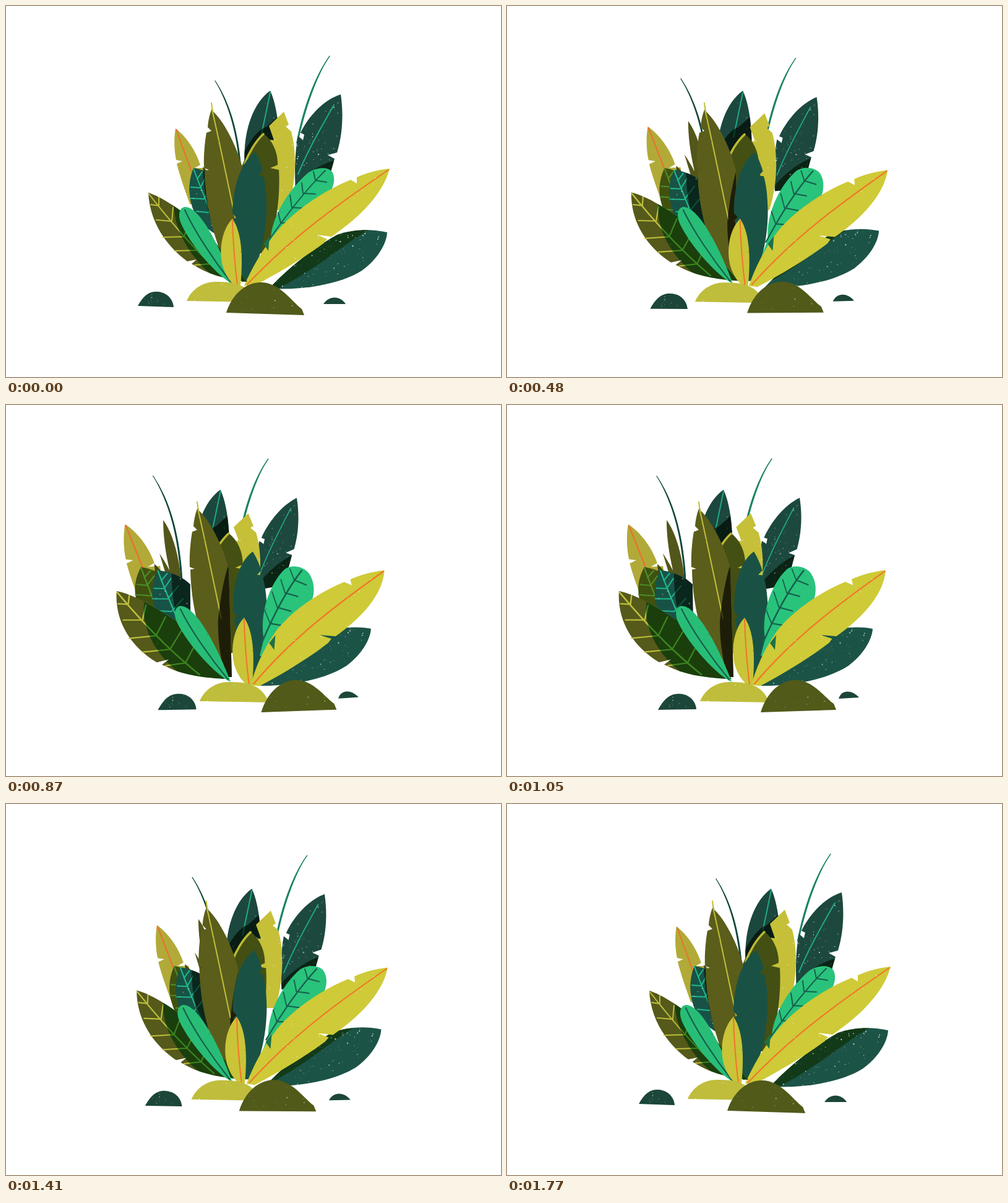
Recreate the animation shown at these times as an HTML page. Size 800x600 px, loop 1800 ms.

```html
<!DOCTYPE html>
<html lang="en">
<head>
<meta charset="utf-8">
<title>Swaying foliage</title>
<style>
  @property --p { syntax: '<number>'; inherits: true; initial-value: 0; }
  html, body { margin: 0; width: 100%; height: 100%; overflow: hidden; background: #fff; }
  svg { display: block; width: 800px; height: 600px; animation: turn .9s cubic-bezier(.5, 0, .5, 1) infinite alternate; }
  @keyframes turn { from { --p: 0; } to { --p: 1; } }
  .part { isolation: isolate; }
  .line { fill: none; stroke-linecap: round; }
  .shade { mix-blend-mode: multiply; }
</style>
</head>
<body>
<svg id="stage" viewBox="0 0 800 600"><defs id="defs"></defs></svg>
<script>
const NS = 'http://www.w3.org/2000/svg';
const stage = document.getElementById('stage');
const defs = document.getElementById('defs');
const REACH = 0.955; // share of the full swing at which the end points were measured

function add(parent, tag, attrs) {
  const el = document.createElementNS(NS, tag);
  for (const k in attrs) el.setAttribute(k, attrs[k]);
  return parent.appendChild(el);
}

// Motions are matrix offsets, scaled by --p and added to the identity.
const shift = (dx, dy) => [0, 0, 0, 0, dx / REACH, dy / REACH];

function warp([x0, y0, x1, y1, x2, y2], [X0, Y0, X1, Y1, X2, Y2]) {
  const ux = x1 - x0, uy = y1 - y0, vx = x2 - x0, vy = y2 - y0;
  const det = ux * vy - vx * uy;
  const solve = (U, V) => [(U * vy - V * uy) / det, (V * ux - U * vx) / det];
  const [a, c] = solve(X1 - X0, X2 - X0);
  const [b, d] = solve(Y1 - Y0, Y2 - Y0);
  const e = X0 - a * x0 - c * y0, f = Y0 - b * x0 - d * y0;
  return [a - 1, b, c, d - 1, e, f].map(n => n / REACH);
}

function animate(el, motion) {
  const cells = motion.map((n, i) =>
    `calc(${i === 0 || i === 3 ? 1 : 0} + var(--p) * ${n.toFixed(5)})`);
  el.style.transform = `matrix(${cells.join(', ')})`;
}

// Grain textures
let seed = 7;
function random() {
  seed = (seed * 16807) % 2147483647;
  return seed / 2147483647;
}

function grain(id, color, count, size) {
  const tile = add(defs, 'pattern', { id, width: 130, height: 130, patternUnits: 'userSpaceOnUse' });
  for (let i = 0; i < count; i++) {
    add(tile, 'circle', {
      cx: (random() * 130).toFixed(1), cy: (random() * 130).toFixed(1),
      r: (0.25 + random() ** 3 * size).toFixed(2), fill: color
    });
  }
}
grain('light', '#e6ead0', 50, 0.7);
grain('snow', '#dfe8dc', 190, 0.8);
grain('dark', '#4a5a1c', 45, 0.7);

let count = 0;
function part({ d, fill, motion, lines = [], shade, grain }) {
  const g = add(stage, 'g', { class: 'part' });
  animate(g, motion);
  add(g, 'path', { d, fill });
  for (const [path, stroke, width] of lines)
    add(g, 'path', { class: 'line', d: path, stroke, 'stroke-width': width });
  if (shade) {
    const id = 'clip' + count++;
    add(add(defs, 'clipPath', { id }), 'path', { d });
    const box = add(g, 'g', { class: 'shade', 'clip-path': `url(#${id})` });
    animate(add(box, 'path', { d: shade.d, fill: shade.fill }), shade.motion);
  }
  if (grain) add(g, 'path', { d, fill: `url(#${grain})` });
}

// Tall stems
part({
  d: 'M338 121C362 156 381 212 382 300L379 300C378 215 361 162 338 121Z', fill: '#10483b',
  motion: warp([381, 255, 338, 121, 481, 255], [288, 250, 242, 115, 388, 250]),
  lines: [['M338 121C362 158 380 213 380.500 300', '#10483b', 1.2]]
});
part({
  d: 'M523 81C499 112 480 165 469 222L472 222C483 167 503 112 523 81Z', fill: '#1d8366',
  motion: warp([471, 215, 523, 81, 571, 215], [381, 215, 428, 87, 481, 215]),
  lines: [['M523 81C501 112 481 166 470.500 222', '#1d8366', 1.5]]
});

// Back leaves
part({
  d: 'M274 198C271 215 272 235 275 249L285 251L276 255C281 275 288 295 297 320L330 330L322 262L305 262L314 257C306 232 290 210 274 198Z',
  fill: '#b1aa38', grain: 'light',
  motion: warp([296, 312, 274, 198, 320, 275], [222, 318, 196, 193, 250, 275]),
  lines: [['M275 200L300 268', '#e8722e', 2]]
});
part({
  d: 'M344 186C358 205 372 245 374 300L362 300C352 260 344 225 344 186ZM338 240C350 258 362 280 366 300L356 300Z',
  fill: '#53561a', grain: 'light', motion: shift(-86, 0)
});
part({
  d: 'M427 137C395 160 380 215 387 270L440 270C444 215 440 165 427 137Z',
  fill: '#1b473e', grain: 'light', motion: shift(-77, 0),
  lines: [['M427 140L412 212', '#20a983', 2]],
  shade: { d: 'M383 240C395 215 410 198 420 196L440 178L450 270L380 270Z', fill: '#4b6350', motion: shift(0, 0) }
});
part({
  d: 'M541 143C512 152 488 180 476 205L482 208L480 217L472 210C467 235 466 265 468 300L505 300L525 268L531 247L520 241L535 237C545 205 545 170 541 143Z',
  fill: '#1c483e', grain: 'snow',
  motion: warp([470, 290, 541, 143, 525, 268], [411, 290, 473, 150, 460, 262]),
  lines: [['M530 160C510 195 487 235 472 272', '#20a983', 2]],
  shade: { d: 'M440 320C470 282 500 255 540 248L540 330L440 330Z', fill: '#5a7a50', motion: shift(6, -4) }
});
part({
  d: 'M449 171L457 192L452 195L461 203C471 240 468 290 455 330L415 330L412 215L433 217L425 194Z',
  fill: '#c5c038', grain: 'light',
  motion: warp([455, 330, 449, 171, 555, 330], [403, 330, 394, 175, 503, 330])
});

// Veined pair on the left
const pair = 'M303 262C294 285 294 310 305 335C315 352 330 365 345 372L356 350L352 288C340 275 325 266 303 262Z';
const pairVeins = 'M303 263C313 290 325 320 345 368M314 294L299 293M320 312L298 311M327 334L308 332M309 280L317 268M314 294L323 277M320 312L335 290M327 334L343 312';
const pairFrom = [303, 262, 335, 365, 352, 288];
part({
  d: pair, fill: '#40510f', grain: 'dark',
  motion: warp(pairFrom, [222, 262, 250, 358, 274, 288]),
  lines: [[pairVeins, '#4c922a', 2]]
});
part({ d: 'M318 260C335 275 345 300 350 330L325 330Z', fill: '#3c4813', motion: shift(-75, -3) });
part({
  d: pair, fill: '#185247', grain: 'light',
  motion: warp(pairFrom, [248, 267, 277, 363, 300, 290]),
  lines: [[pairVeins, '#1fb98b', 2]],
  shade: { d: 'M318 250C318 300 328 350 345 380L380 380L380 250Z', fill: '#647566', motion: shift(5, 0) }
});

// Middle leaves
part({
  d: 'M416 206C432 218 440 240 439 257L427 262L441 265C444 310 435 360 425 400L385 400L380 262C388 240 402 220 416 206Z',
  fill: '#444f13', grain: 'dark', motion: shift(-54, 1),
  lines: [['M416 207C403 219 392 238 386 255', '#bdb934', 3.5]]
});
part({
  d: 'M332 156L335 171C352 186 374 228 383 265L388 440L365 440C340 390 322 330 321 266L328 265L320 262C319 240 322 215 324 205L332 202L326 196C327 183 330 172 333 166Z',
  fill: '#5b5d1b', grain: 'dark', motion: shift(-22, 0),
  lines: [['M332 157L334 172C345 220 355 270 371 345', '#c2bf3a', 2]],
  shade: { d: 'M392 255C380 290 376 330 374 350C374 390 380 420 390 450L410 450L410 255Z', fill: '#525248', motion: shift(-8, 0) }
});
part({
  d: 'M403 236C380 252 367 290 366 335L372 342L367 346C370 385 376 420 381 446L392 446C408 420 420 375 421 330C421 305 420 290 416 275L408 274L415 267C412 255 408 245 403 236Z',
  fill: '#195244', grain: 'dark',
  motion: warp([385, 445, 403, 236, 485, 445], [392, 443, 399, 237, 492, 443])
});

// Right leaves
part({
  d: 'M428 375C430 340 458 295 488 270C500 261 520 259 527 268C533 278 530 292 522 305L440 400L415 400Z',
  fill: '#29c37c', grain: 'dark',
  motion: warp([418, 395, 528, 270, 440, 330], [412, 400, 493, 275, 418, 327]),
  lines: [['M516 266C485 297 455 335 424 380M500 282L497 268M500 282L518 285M480 303L478 286M480 303L500 304M462 326L459 306M462 326L483 327M444 351L440 334M444 351L465 350', '#17604c', 2]]
});
part({
  d: 'M616 366C590 360 560 361 535 370C490 395 450 430 425 457C480 460 540 450 575 428C600 410 615 385 616 366Z',
  fill: '#1b5346', grain: 'snow',
  motion: warp([430, 457, 616, 366, 520, 452], [415, 454, 591, 362, 500, 446]),
  shade: { d: 'M560 350L588 361C545 385 510 420 440 457L400 457Z', fill: '#a2b05a', motion: shift(-25, -8) }
});
part({
  d: 'M620 263C600 265 582 270 567 277L567 287L557 281C510 300 465 333 440 362C415 392 397 425 385 452L398 454C440 432 480 408 513 384L519 377L503 370L526 373C560 350 608 310 620 263Z',
  fill: '#cfca37', grain: 'light',
  motion: warp([388, 452, 620, 263, 470, 330], [398, 453, 612, 267, 462, 335]),
  lines: [['M618 265C560 305 470 365 390 450', '#f2752b', 2]]
});
part({ d: 'M416 385L426 372L424 396Z', fill: '#1d7048', motion: shift(9, 0) });

// Front left leaves
part({
  d: 'M230 302C252 308 290 335 320 360L390 446C365 443 335 437 312 424L300 417L308 410L293 413C255 385 232 345 230 302Z',
  fill: '#55591a', grain: 'dark',
  motion: warp([355, 441, 230, 302, 293, 412], [320, 441, 181, 301, 246, 415]),
  lines: [['M231 304C255 335 300 390 350 436M247 323L247 310M247 323L234 321M268 348L270 326M268 348L243 346M288 373L297 346M288 373L254 374M308 395L320 368M308 395L273 396M330 417L340 390M330 417L305 419', '#bdbe3b', 2]],
  shade: { d: 'M272 315C268 350 290 405 345 445L400 450L400 300Z', fill: '#50b27a', motion: shift(-4, 0) }
});
part({
  d: 'M367 450C345 440 300 390 283 352C276 335 282 325 290 325C312 325 345 385 367 450Z',
  fill: '#28bd77', grain: 'dark',
  motion: warp([365, 447, 285, 326, 465, 447], [361, 445, 278, 326, 461, 445]),
  lines: [['M289 330C305 365 335 410 363 446', '#175f4a', 2.2]]
});
part({
  d: 'M366 344C350 360 343 392 350 420C355 437 364 448 372 454L379 452C382 420 384 370 366 344Z',
  fill: '#cac438', grain: 'dark', motion: shift(18, 0),
  lines: [['M366 347C367 385 370 420 374 452', '#f2752b', 2]]
});

// Mounds
part({
  d: 'M292 477C300 457 320 446 338 446C370 446 392 450 404 479Z',
  fill: '#bfbd3b', grain: 'light', motion: shift(20, 2)
});
part({
  d: 'M356 496C366 465 388 447 412 447C442 447 462 478 478 490L482 500Z',
  fill: '#515a19', grain: 'light',
  motion: warp([356, 495, 482, 500, 410, 447], [410, 496, 532, 493, 462, 445])
});
part({
  d: 'M213 485C222 468 232 461 245 462C260 463 270 474 271 487Z',
  fill: '#1b4639', grain: 'snow',
  motion: warp([213, 485, 271, 487, 243, 462], [244, 493, 306, 492, 276, 467])
});
part({
  d: 'M513 482C522 468 540 468 549 482Z',
  fill: '#1b4639', grain: 'snow',
  motion: warp([513, 482, 549, 482, 533, 471], [536, 475, 569, 473, 551, 463])
});
</script>
</body>
</html>
```
